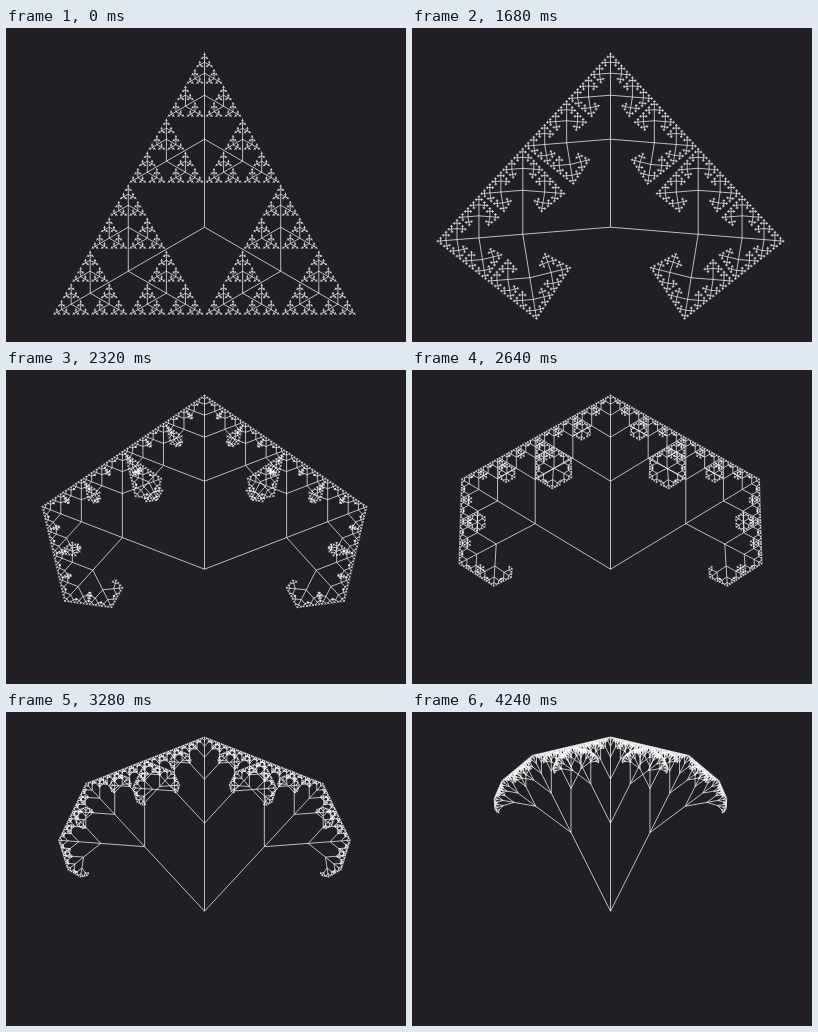
Recreate the animation shown at these times as an HTML page with a canvas. Size 400 px wide and 314 px high, loop 5.92 s.

```html
<!DOCTYPE html>
<html lang="en">
<head>
<meta charset="utf-8">
<title>Folding fractal tree</title>
<style>
  html, body { margin: 0; width: 100%; height: 100%; overflow: hidden; background: #211e24; }
  canvas { display: block; }
</style>
</head>
<body>
<canvas id="stage" width="400" height="314"></canvas>
<script>
const ctx = document.getElementById('stage').getContext('2d');
const LOOP = 5920, HOLD = 1240, STEP = 40, STEPS = 76;
const ROOT = { x: 198.5, y: 199.2 }, LENGTH = 88, DEPTH = 7;
const START = Math.PI * 2 / 3, SHRINK = 1.02;

function branch(x, y, dir, len, spread, depth) {
  for (const turn of [-spread, 0, spread]) {
    const a = dir + turn;
    const x2 = x + len * Math.sin(a), y2 = y - len * Math.cos(a);
    ctx.moveTo(x, y);
    ctx.lineTo(x2, y2);
    if (depth > 1) branch(x2, y2, a, len / 2, spread, depth - 1);
  }
}

function draw(step) {
  ctx.fillStyle = '#211e24';
  ctx.fillRect(0, 0, 400, 314);
  ctx.strokeStyle = '#fff';
  ctx.lineWidth = 0.7;
  ctx.beginPath();
  branch(ROOT.x, ROOT.y, 0, LENGTH, START / SHRINK ** step, DEPTH);
  ctx.stroke();
}

let shown = -1;
function tick() {
  const t = performance.now() % LOOP;
  const step = Math.max(0, Math.min(STEPS, Math.floor((t - HOLD) / STEP) + 1));
  if (step !== shown) draw(shown = step);
  requestAnimationFrame(tick);
}
tick();
</script>
</body>
</html>
```
